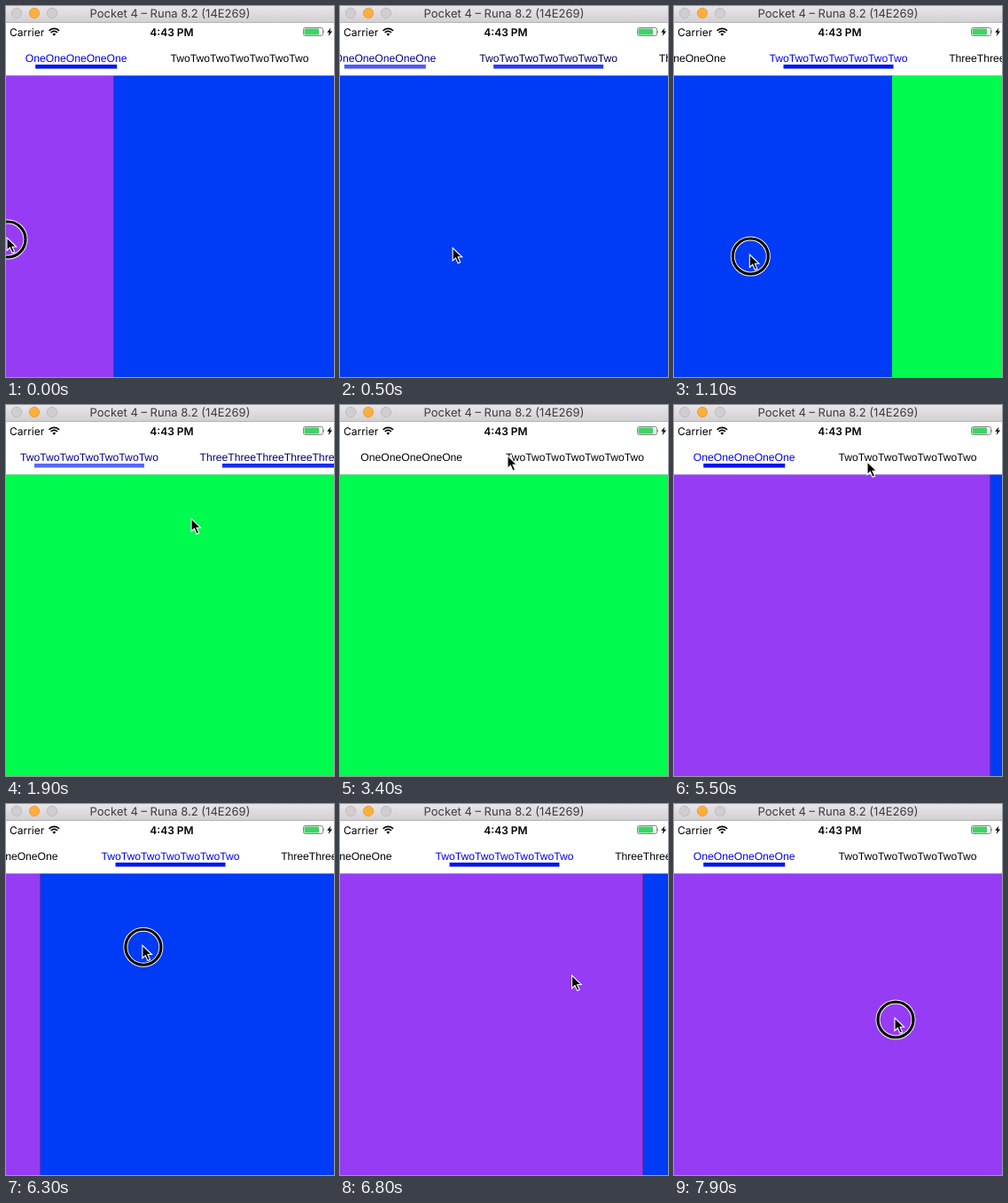
An HTML page that plays this animation: 370 px wide and 418 px high, repeating every 8000 ms.

```html
<!DOCTYPE html>
<html lang="en">
<head>
<meta charset="utf-8">
<title>Tab pager</title>
<style>
  html, body { margin: 0; width: 100%; height: 100%; overflow: hidden; background: #fff; }
  svg { display: block; width: 370px; height: 418px; text-rendering: geometricPrecision; }
  .ui { font-family: Inter, "Open Sans", sans-serif; font-size: 12px; }
  .tab { font: 12.15px "Liberation Sans", Arial, sans-serif; }
</style>
</head>
<body>
<svg viewBox="0 0 370 418">
  <defs>
    <linearGradient id="chrome" x2="0" y2="1">
      <stop stop-color="#e8e6e8"/>
      <stop offset="1" stop-color="#d2d0d2"/>
    </linearGradient>
  </defs>
  <rect width="370" height="418" fill="#fff"/>

  <rect id="right" y="78" width="370" height="340"/>
  <rect id="left" y="78" height="340"/>
  <rect id="seam" y="78" width="1" height="340" opacity=".28"/>
  <rect y="78" width="370" height="1" fill="#c6c6c8" opacity=".5"/>
  <g id="tabs"></g>

  <g class="ui">
    <rect width="370" height="18" fill="url(#chrome)"/>
    <rect y="18" width="370" height="1" fill="#b4b2b4"/>
    <g stroke-width=".8">
      <circle cx="12" cy="8" r="5.7" fill="#d0ced0" stroke="#b9b7b9"/>
      <circle cx="32" cy="8" r="5.7" fill="#fdae3c" stroke="#e39b38"/>
      <circle cx="52" cy="8" r="5.7" fill="#d0ced0" stroke="#b9b7b9"/>
    </g>
    <text x="185" y="13" text-anchor="middle" font-size="13" fill="#3c3a3c">Pocket 4 – Runa 8.2 (14E269)</text>
    <text x="4" y="33.5">Carrier</text>
    <text x="187" y="33.5" text-anchor="middle" font-weight="600">4:43 PM</text>
    <g fill="none" stroke="#000" stroke-width="1.7">
      <path d="M48.6 27.8a8 8 0 0 1 11.4 0M50.7 30a5 5 0 0 1 7.2 0"/>
      <path d="M54.3 33.8l-1.9-2.1a2.7 2.7 0 0 1 3.8 0z" fill="#000" stroke="none"/>
    </g>
    <rect x="335.5" y="24.5" width="22" height="9" rx="2" fill="#fff" stroke="#777" stroke-width=".9"/>
    <rect x="336.5" y="25.5" width="16.5" height="7" rx="1" fill="#3fd267"/>
    <path d="M358.4 27.3q1.6 1.7 0 3.4z" fill="#777"/>
    <path d="M366.5 24.5l-4.3 5.2h2.5l-1.2 4.3 4.6-5.6h-2.7z"/>
  </g>

  <g id="pointer">
    <g id="ring" fill="none">
      <circle cx="1" cy="2" r="20" stroke="#fff" stroke-width="5"/>
      <circle cx="1" cy="2" r="20" stroke="#000" stroke-width="3.2"/>
    </g>
    <path d="M0 0v14.5l3.4-3.2 2.6 5.9 2.6-1.1-2.6-5.8h4.6z" stroke="#fff" stroke-width="1.1"/>
  </g>
</svg>
<script>
const LOOP = 8000, STEP = 100, W = 370;
const PURPLE = '#963cf5', BLUE = '#003bf6', GREEN = '#00fb4f';
const $ = id => document.getElementById(id);
const set = (el, attrs) => { for (const k in attrs) el.setAttribute(k, attrs[k]); };
const mix = (a, b, k) => a + (b - a) * k;
const span = (t, start, end) => Math.min(1, Math.max(0, (t - start) / (end - start)));
const smooth = u => u * u * (3 - 2 * u);
const easeOut = u => 1 - (1 - u) ** 3;
const last = (list, t) => list.filter(e => e.start <= t).pop();

// Stops of the pointer: time, x, y
const stops = [
  [100, 1, 261], [800, 209, 280], [900, 209, 280], [1200, 42, 280], [1900, 209, 128],
  [2300, 165, 58], [2700, 165, 58], [3000, 340, 69], [3400, 189, 57], [3700, 136, 51],
  [4600, 136, 51], [4900, 218, 64], [5500, 218, 64], [6100, 115, 152], [6200, 115, 152],
  [6500, 265, 180], [7500, 249, 241]
];
function pointerAt(t) {
  const i = stops.findIndex(s => s[0] > t);
  const b = stops.at(i), a = i > 0 ? stops[i - 1] : b;
  const k = smooth(span(t, a[0], b[0] + (a === b)));
  return { x: mix(a[1], b[1], k), y: mix(a[2], b[2], k) };
}

// Page changes: the boundary follows the pointer until release, then settles.
// A tap is released as it starts.
const slides = [
  { start: 0, release: 100, end: 400, from: W, to: 0, pages: [PURPLE, BLUE], grab: 249 },
  { start: 900, release: 1300, end: 1700, from: W, to: 0, pages: [BLUE, GREEN] },
  { start: 4135, release: 4135, end: 4525, from: 0, to: W, pages: [PURPLE, GREEN] },
  { start: 5450, release: 5450, end: 5900, from: W, to: 0, pages: [PURPLE, BLUE] },
  { start: 6200, release: 6600, end: 7000, from: 0, to: W, pages: [PURPLE, BLUE] }
];
function drawPages(t) {
  const s = last(slides, t), tap = s.start === s.release;
  const grab = s.grab ?? pointerAt(s.start).x;
  const dragged = s.from + pointerAt(Math.min(t, s.release)).x - grab;
  const k = (tap ? smooth : easeOut)(span(t, s.release, s.end));
  const x = Math.round(mix(dragged, s.to, k));
  set($('left'), { width: x, fill: s.pages[0] });
  set($('right'), { fill: s.pages[1] });
  set($('seam'), { x: x - 1, visibility: x > 0 && x < W ? 'visible' : 'hidden' });
}

// Tab selection changes; the strip scrolls from its resting place to the tab's home
const HOMES = [0, 78, 294];
const FLICK = 2700;
const moves = [
  { start: -1000, from: 1, to: 0, rest: 78 },
  { start: 300, from: 0, to: 1, rest: 0 },
  { start: 1680, from: 1, to: 2, rest: 78 },
  { start: 4050, from: 2, to: 0, rest: 0 },
  { start: 5600, from: 0, to: 1, rest: 0 },
  { start: 7000, from: 1, to: 0, rest: 78 }
];
const tabs = [['One', 5, 21.7, 115], ['Two', 7, 186, 155], ['Three', 8, 388, 254]].map(([word, n, x, w]) => {
  const make = (tag, attrs) => {
    const el = document.createElementNS('http://www.w3.org/2000/svg', tag);
    set(el, attrs);
    return $('tabs').appendChild(el);
  };
  const text = make('text', { x: x + w / 2, y: 63, 'text-anchor': 'middle', class: 'tab' });
  text.textContent = word.repeat(n);
  const bar = make('rect', { x: x + w * 0.1, y: 66, width: w * 0.8, height: 4.6, fill: '#0014f5' });
  return { text, bar };
});
function drawTabs(t) {
  const m = last(moves, t), k = smooth(span(t, m.start, m.start + 490));
  let scroll = mix(m.rest, HOMES[m.to], k);
  if (m.to === 2 && t > FLICK) {
    const sec = (t - FLICK) / 1000;
    scroll = HOMES[2] * Math.exp(-6 * sec) * Math.cos(2.75 * sec);
  }
  set($('tabs'), { transform: `translate(${-scroll} 0)` });
  tabs.forEach(({ text, bar }, i) => {
    const tint = i === m.to ? k : i === m.from ? 1 - k : 0;
    set(text, { fill: `rgb(0,0,${Math.round(238 * tint)})` });
    set(bar, { opacity: i === m.to ? 1 - (1 - tint) ** 4 : tint ** 0.8 });
  });
}

const presses = [[0, 0], [800, 1200], [2700, 3000], [3800, 3900], [5400, 5400], [6200, 6500], [7800, 7900]];
function drawPointer(t) {
  const { x, y } = pointerAt(t);
  set($('pointer'), { transform: `translate(${x} ${y})` });
  const down = presses.some(([a, b]) => t >= a && t <= b);
  set($('ring'), { visibility: down ? 'visible' : 'hidden' });
}

const begin = performance.now();
function draw() {
  const t = Math.floor((performance.now() - begin) % LOOP / STEP) * STEP;
  drawPages(t);
  drawTabs(t);
  drawPointer(t);
  requestAnimationFrame(draw);
}
draw();
</script>
</body>
</html>
```
